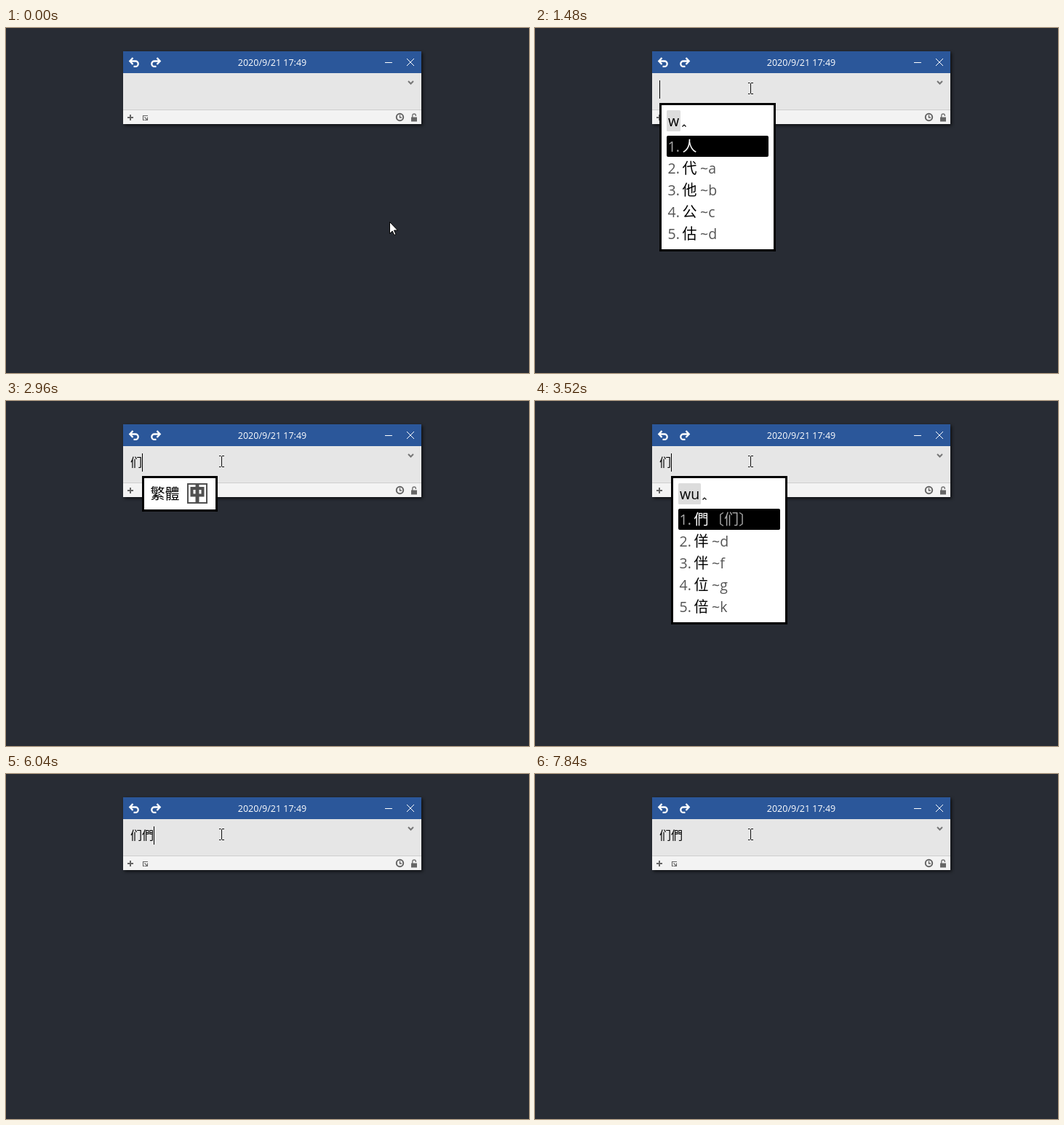
An HTML page that plays this animation: 719x474 px, repeating every 8 s.

```html
<!DOCTYPE html>
<html lang="zh">
<head>
<meta charset="utf-8">
<style>
  html, body { margin: 0; width: 100%; height: 100%; overflow: hidden; background: #282c34; }
  svg { display: block; width: 719px; height: 474px; }
  text { font: 20px "Noto Sans CJK SC", "Noto Sans CJK", sans-serif; white-space: pre; }
  .latin { font: 19.5px "Open Sans", "Noto Sans", sans-serif; }
  .title { font: 12.5px "Open Sans", "Noto Sans", sans-serif; fill: #fff; text-anchor: middle; }
  #note { font-size: 16px; }
  #window { filter: drop-shadow(2px 2px 2px rgba(0, 0, 0, .65)); }
  .line { fill: none; }
</style>
</head>
<body>
<svg viewBox="0 0 719 474">
  <g id="window">
    <rect x="161" y="32" width="410" height="30" fill="#2b579a"/>
    <rect x="161" y="62" width="410" height="50" fill="#e6e6e6"/>
    <rect x="161" y="112" width="410" height="1" fill="#cfcfcf"/>
    <rect x="161" y="113" width="410" height="19" fill="#f3f3f3"/>
  </g>
  <text class="title" x="366" y="52">2020/9/21 17:49</text>
  <g class="line" stroke="#fff">
    <g stroke-width="2.3">
      <path id="undo" d="M174.5 41L170.3 45.5L174.5 50M170.5 45.5H178a3.7 3.7 0 0 1 0 7.4H175.5"/>
      <use href="#undo" transform="matrix(-1 0 0 1 382 0)"/>
    </g>
    <path d="M521 47.5H531M551 42L561 52M561 42L551 52"/>
  </g>
  <g class="line" stroke="#666" stroke-width="2">
    <path d="M553 73L556.5 76.5L560 73" stroke="#777"/>
    <path d="M167 123H175M171 119V127"/>
    <path d="M195 120.5H188.5V126.5H190M190.5 122.5L194 126M194.5 122.5V126.5H190.5" stroke-width="1.1"/>
    <circle cx="541.5" cy="122.5" r="4.7"/>
    <path d="M541.5 119.5V123H544" stroke-width="1.4"/>
    <path d="M558.8 123V120.3a2.3 2.3 0 0 1 4.6 0V121" stroke="#777" stroke-width="1.4"/>
    <rect x="557" y="122.5" width="8" height="6" fill="#666" stroke="none"/>
  </g>
  <text id="note" x="171" y="90"></text>
  <rect id="caret" y="72" width="1" height="25"/>
  <g id="popup"></g>
  <path id="arrow" d="M.5 .5V16.5L4.2 13L6.8 18.5L9 17.5L6.5 12H11.5Z" fill="#fff" stroke="#000"/>
  <path id="beam" class="line" d="M-3 -7.5H-.5M1 -7.5H4M.5 -7V7M-3 7.5H-.5M1 7.5H4" stroke="#111"/>
</svg>
<script>
const LOOP = 8000, TICK = 40;
const el = id => document.getElementById(id);

const tip = label => `
  <rect x="1.5" y="1.5" width="101" height="46" fill="#fff" stroke="#000" stroke-width="3"/>
  <text x="11.5" y="32">${label}</text>
  <g class="line" stroke="#505050">
    <rect x="63" y="11" width="26" height="26" stroke-width="2"/>
    <rect x="68.5" y="17" width="15" height="9.5" stroke-width="4"/>
    <path d="M76 12V36" stroke-width="5"/>
  </g>`;

function row([word, hint = ""], i) {
  const y = 67 + 30 * i, first = i === 0;
  const gray = first ? "#aaa" : "#555";
  const latin = hint.startsWith("~");
  return `<text class="latin" x="11.5" y="${y}" fill="${gray}">${i + 1}.</text>
    <text x="31.5" y="${y}" fill="${first ? "#fff" : "#000"}">${word}</text>
    <text class="${latin ? "latin" : ""}" x="${latin ? 56 : 53}" y="${y}" fill="${gray}">${hint}</text>`;
}

function menu(keys, words) {
  const width = keys.length > 1 ? 31 : 19;
  return `
    <rect x="1.5" y="1.5" width="157" height="201" fill="#fff" stroke="#000" stroke-width="3"/>
    <rect x="10" y="10" width="${width}" height="29" rx="1.5" fill="#dcdcdc"/>
    <text class="latin" x="12" y="32">${keys}</text>
    <path class="line" d="M${width + 12.5} 32.5l2.5 -2.5l2.5 2.5" stroke="#000" stroke-width="1.2"/>
    <rect x="10" y="45" width="140" height="29" rx="2"/>
    ${words.map(row).join("")}`;
}

const menuW = menu("w", [["人"], ["代", "~a"], ["他", "~b"], ["公", "~c"], ["估", "~d"]]);
const menuWu = (...first) => menu("wu", [first, ["佯", "~d"], ["伴", "~f"], ["位", "~g"], ["倍", "~k"]]);
const simplified = menuWu("们"), traditional = menuWu("們", "〔们〕");

// Each step changes only the properties it names.
const steps = [
  [0, { note: "", caret: false, popup: "" }],
  [640, { caret: true }],
  [1160, { caret: false }],
  [1480, { caret: true, popup: menuW }],
  [1600, { popup: simplified }],
  [1840, { popup: "" }],
  [1880, { note: "们" }],
  [2400, { caret: false }],
  [2800, { popup: tip("繁體") }],
  [2960, { caret: true }],
  [3320, { popup: "" }],
  [3360, { popup: menuW }],
  [3520, { popup: traditional }],
  [3800, { note: "们們", popup: "" }],
  [4360, { caret: false }],
  [4640, { popup: tip("简体") }],
  [4840, { caret: true }],
  [5360, { caret: false }],
  [5920, { caret: true }],
  [6040, { popup: "" }],
  [6120, { popup: menuW }],
  [6640, { caret: false }],
  [7000, { popup: simplified }],
  [7160, { caret: true }],
  [7280, { popup: "" }],
  [7840, { caret: false }],
];

function pointerAt(time) {
  if (time < 40) return [527, 266];
  if (time < 80) return [350, 100];
  const p = Math.min(1, Math.max(0, (time - 240) / 400));
  const eased = p * p * (3 - 2 * p);
  return [264 + 32 * Math.min(1, eased * 1.4), 17 + 66 * eased].map(Math.round);
}

let shownPopup = "";
function draw(now) {
  const time = Math.floor(now % LOOP / TICK) * TICK;
  const state = Object.assign({}, ...steps.filter(([at]) => at <= time).map(([, change]) => change));
  const caretX = 171 + 16 * state.note.length;
  el("note").textContent = state.note;
  el("caret").setAttribute("x", caretX);
  el("caret").style.display = state.caret ? "" : "none";
  el("popup").setAttribute("transform", `translate(${caretX} 103)`);
  if (state.popup !== shownPopup) el("popup").innerHTML = shownPopup = state.popup;

  const [x, y] = pointerAt(time);
  const editing = time >= 80 && y >= 62;
  for (const id of ["arrow", "beam"]) {
    el(id).setAttribute("transform", `translate(${x} ${y})`);
    el(id).style.display = (id === "beam") === editing ? "" : "none";
  }
}

let start;
function frame(now) {
  start ??= now;
  draw(now - start);
  requestAnimationFrame(frame);
}
draw(0);
requestAnimationFrame(frame);
</script>
</body>
</html>
```
